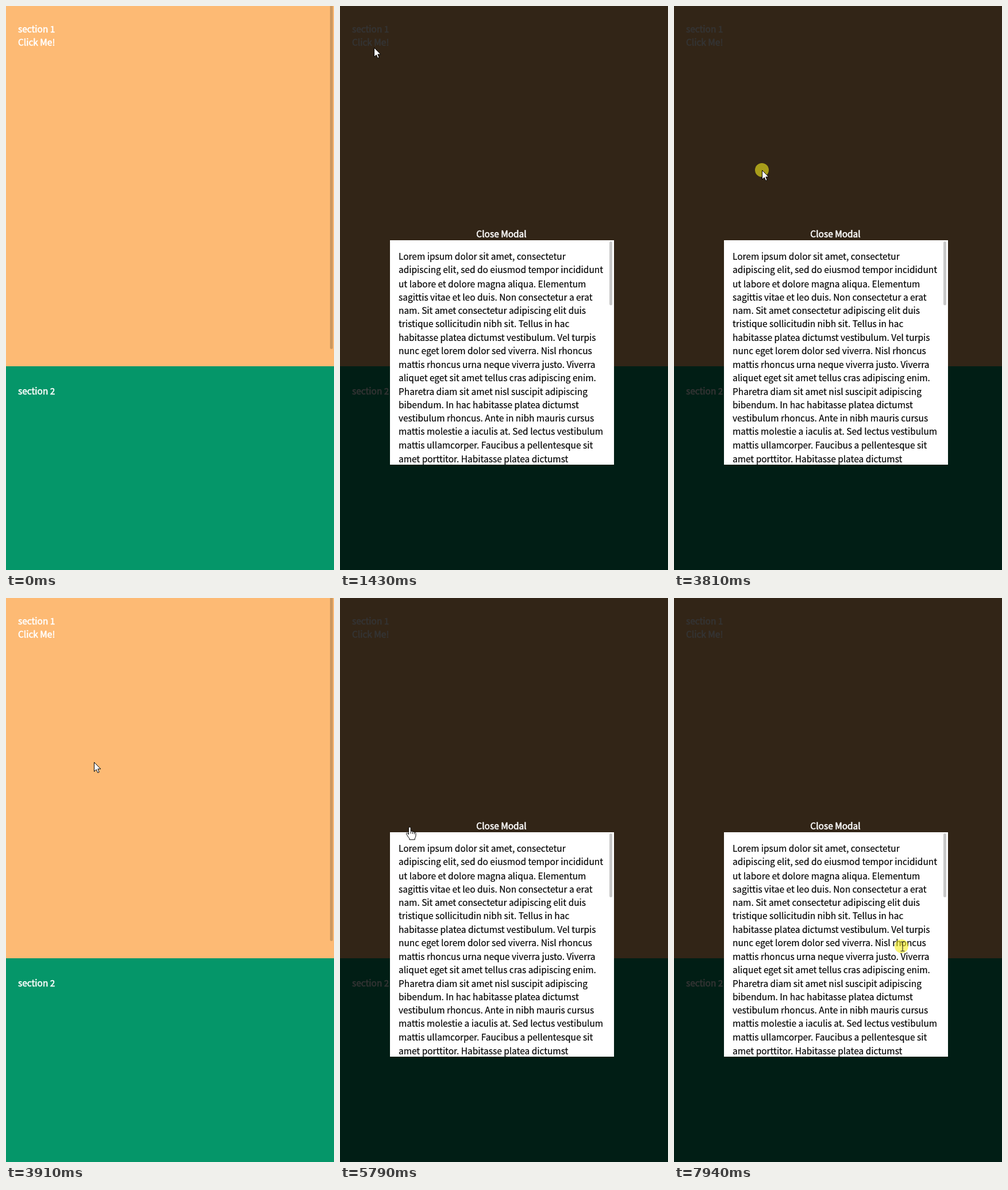
Write an HTML page that moves like this. It is 571 px wide and 980 px high and loops after 8 s.

```html
<!DOCTYPE html>
<html lang="en">
<head>
<meta charset="utf-8">
<title>Modal demo</title>
<style>
  html, body { margin: 0; width: 100%; height: 100%; overflow: hidden; }
  body { position: relative; background: linear-gradient(#fdba74 626px, #059669 626px); }
  body > *, #modal > * { position: absolute; }
  .text {
    font: 16px/24.25px "Noto Sans CJK KR", "Noto Sans CJK JP", "Noto Sans CJK SC", "Noto Sans", sans-serif;
    white-space: pre;
    transform: scale(.965);
    transform-origin: 0 0;
    -webkit-text-stroke: .2px;
  }
  .light { color: #fff; -webkit-text-stroke-width: .6px; }
  .bar { width: 5.4px; border-radius: 3px; }
  #pageBar { left: 564px; top: -10px; height: 606px; background: #cd995f; }
  #modal { inset: 0; background: rgba(0, 0, 0, .8); }
  #close { left: 281.3px; top: 383.6px; transform: scale(.965) translateX(-50%); }
  #panel { left: 86.5px; top: 407.2px; width: 390px; height: 390.3px; background: #fff; }
  #copy { left: 101.6px; top: 422.5px; color: #000; }
  #modalBar { left: 468.5px; top: 408.5px; height: 111.5px; background: #c8c8c8; }
  svg { left: 0; top: 0; width: 571px; height: 980px; }
  .pointer { fill: #fff; stroke: #000; stroke-linejoin: round; }
  .beam { fill: none; stroke: #222; stroke-width: 1.1; }
</style>
</head>
<body>
<div class="text light" style="left:21.3px; top:27.6px">section 1
Click Me!</div>
<div class="text light" style="left:21.3px; top:656.6px">section 2</div>
<div class="bar" id="pageBar"></div>

<div id="modal">
  <div class="text light" id="close">Close Modal</div>
  <div id="panel"></div>
  <div class="text" id="copy">Lorem ipsum dolor sit amet, consectetur
adipiscing elit, sed do eiusmod tempor incididunt
ut labore et dolore magna aliqua. Elementum
sagittis vitae et leo duis. Non consectetur a erat
nam. Sit amet consectetur adipiscing elit duis
tristique sollicitudin nibh sit. Tellus in hac
habitasse platea dictumst vestibulum. Vel turpis
nunc eget lorem dolor sed viverra. Nisl rhoncus
mattis rhoncus urna neque viverra justo. Viverra
aliquet eget sit amet tellus cras adipiscing enim.
Pharetra diam sit amet nisl suscipit adipiscing
bibendum. In hac habitasse platea dictumst
vestibulum rhoncus. Ante in nibh mauris cursus
mattis molestie a iaculis at. Sed lectus vestibulum
mattis ullamcorper. Faucibus a pellentesque sit
amet porttitor. Habitasse platea dictumst</div>
  <div class="bar" id="modalBar"></div>
</div>

<svg viewBox="0 0 571 980">
  <g id="cursor">
    <circle id="ring" r="12" fill="#f7ee1c" opacity=".6"/>
    <path id="arrow" class="pointer" d="M.5.5V16.5L4.2 13 6.7 18.6 9.2 17.5 6.8 12H11.8Z"/>
    <g id="hand" class="pointer">
      <path d="M-1.9 13V1.9a1.9 1.9 0 0 1 3.8 0V7.5q1.7-1 3.2.8 1.6-.8 3 .9 2-.6 2.6 1.6V15q0 2.6-1.8 5V22H-.4V20q-2.4-2.6-3.8-5.4L-6 11.6q.6-2.2 2.6-.8Z"/>
      <path d="M1.9 8v3.5M5.1 9v3M8.1 10v2.5"/>
    </g>
    <path id="beam" class="beam" d="M-1.5-7.5H5.5M2-7.5V8.5M-1.5 8.5H5.5"/>
  </g>
</svg>
<script>
const LOOP = 8000;
const PRESS = 60;   // how long the click ring stays
const REACT = 100;  // delay before the page answers a click
const clicks = [1320, 3805, 4875, 6360, 7390, 7940];
const toggles = clicks.slice(0, 3).map(t => t + REACT);

// Each stop: departure, arrival, position, sideways bow of the path
const start = { x: 560, y: 1030 };
const stops = [
  { from: 30, to: 930, x: 84, y: 29 },
  { from: 930, to: 1180, x: 59, y: 72 },
  { from: 1570, to: 2370, x: 210, y: 441, bow: .2 },
  { from: 2385, to: 2790, x: 120, y: 317, bow: .2 },
  { from: 2985, to: 3490, x: 153, y: 285, bow: -.8 },
  { from: 3980, to: 4590, x: 60, y: 78 },
  { from: 4635, to: 4870, x: 57, y: 63 },
  { from: 5110, to: 5915, x: 110, y: 423, bow: .34 },
  { from: 6570, to: 6890, x: 231, y: 466 },
  { from: 7010, to: 7210, x: 399, y: 532 },
  { from: 7570, to: 7940, x: 396, y: 605 }
];

const el = id => document.getElementById(id);
const show = (id, on) => { el(id).style.visibility = on ? 'visible' : 'hidden'; };
const smooth = p => p * p * (3 - 2 * p);

function glide(a, b, p) {
  const bow = (b.bow || 0) * 2 * p * (1 - p);
  const dx = b.x - a.x, dy = b.y - a.y;
  return { x: a.x + dx * p + dy * bow, y: a.y + dy * p - dx * bow };
}

function pointerAt(t) {
  const next = stops.findIndex(s => t < s.to);
  if (next < 0) return stops[stops.length - 1];
  const stop = stops[next];
  const p = Math.max(0, (t - stop.from) / (stop.to - stop.from));
  return glide(stops[next - 1] || start, stop, smooth(p));
}

function shapeAt({ x, y }, open, waiting) {
  if (open) {
    if (x < 87 || x > 476 || y < 384 || y > 797) return 'arrow';
    return y < 418 ? 'hand' : 'beam';
  }
  if (x < 21 || x > 87 || y < 28 || y > 76) return 'arrow';
  if (y < 52) return 'beam';
  return waiting ? 'arrow' : 'hand';
}

function draw(t) {
  const open = toggles.filter(at => t >= at).length % 2 === 1;
  const clickedWithin = (a, b) => clicks.some(c => t - c >= a && t - c < b);
  const pos = pointerAt(t);
  const shape = shapeAt(pos, open, clickedWithin(PRESS, REACT));
  show('modal', open);
  show('pageBar', !open);
  show('ring', clickedWithin(0, PRESS));
  for (const id of ['arrow', 'hand', 'beam']) show(id, id === shape);
  el('cursor').setAttribute('transform', `translate(${pos.x.toFixed(1)} ${pos.y.toFixed(1)})`);
}

const begin = performance.now();
function tick() {
  draw((performance.now() - begin) % LOOP);
  requestAnimationFrame(tick);
}
tick();
</script>
</body>
</html>
```
